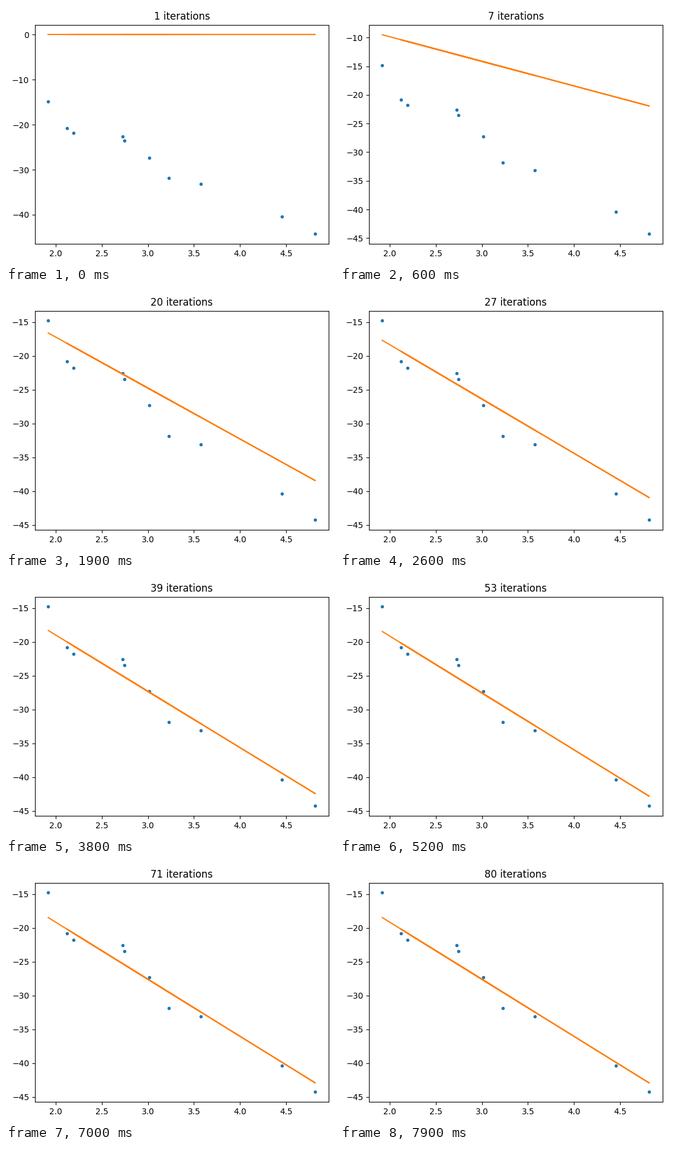
Write a matplotlib script that moves like this. It is 554 by 435 pixels and loops after 8 s.

```python
import matplotlib.pyplot as plt
import numpy as np
from matplotlib.animation import FuncAnimation

W, H, DPI = 554, 435, 100
FRAMES, RATE = 80, 0.01

# Unsorted samples, so the fitted line doubles back over itself
rng = np.random.RandomState(0)
x = 5 * rng.rand(10)
y = -10 * x + 5 * rng.rand(10)


def fit(steps):
    """Line after some steps of gradient descent, starting from zero."""
    slope = bias = 0.0
    for _ in range(steps):
        err = slope * x + bias - y
        slope -= RATE * np.mean(err * x)
        bias -= RATE * np.mean(err)
    return slope * x + bias


# The small surplus keeps the pixel size from being floored one short
fig = plt.figure(figsize=((W + 0.01) / DPI, (H + 0.01) / DPI), dpi=DPI)
ax = fig.add_axes([48.9 / W, 33.72 / H, 496 / W, 369.6 / H])
ax.plot(x, y, ".")
line, = ax.plot(x, np.zeros_like(x))
title = ax.set_title("")


def update(i):
    line.set_ydata(fit(i))
    title.set_text(f"{i + 1} iterations")
    ax.relim()
    ax.autoscale_view()
    return line, title


anim = FuncAnimation(fig, update, frames=FRAMES, init_func=lambda: update(0),
                     interval=100, repeat=True, repeat_delay=0)
plt.show()
```
